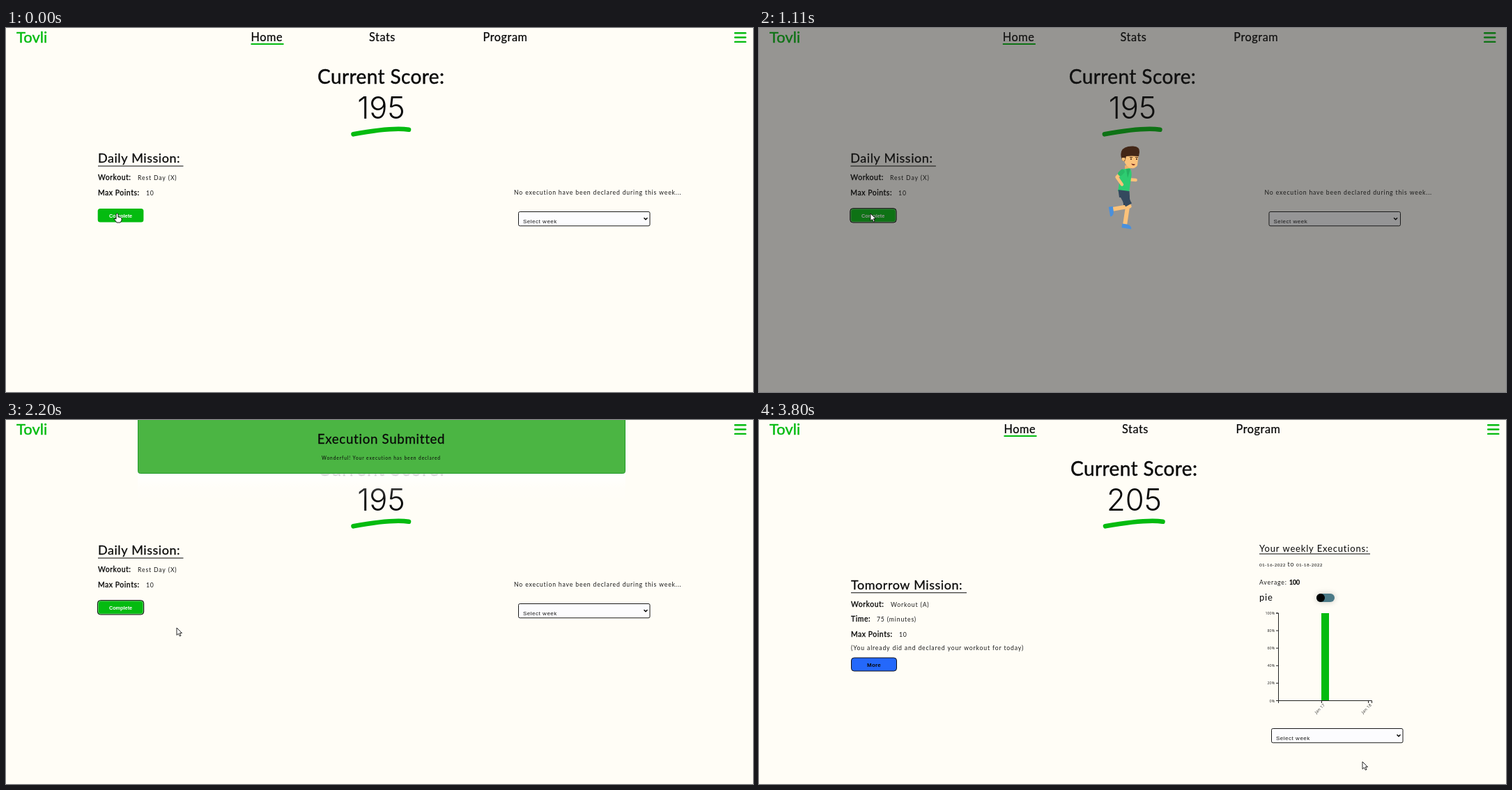
Animation of 1072x522 px, one loop 4.65 s. Source, as an HTML page with a canvas:

```html
<!DOCTYPE html>
<html lang="en">
<head>
<meta charset="utf-8">
<title>Daily mission</title>
<style>
  html, body { margin: 0; width: 100%; height: 100%; overflow: hidden; background: #fffdf6; }
  canvas { display: block; }
</style>
</head>
<body>
<canvas id="stage" width="1072" height="522"></canvas>
<script>
const ctx = document.getElementById('stage').getContext('2d');
const LOOP = 4650;
const GREEN = '#04bb10', INK = '#080808', PAPER = '#fffdf6', SKIN = '#fbc27a';
const MODAL_IN = 710, MODAL_OUT = 1530, TOAST_OUT = 2350, SWAP = 2660;
const UI = '"Liberation Sans", Arial, sans-serif';
const ROUND = 'Lato, "Open Sans", sans-serif';

// The page is slightly narrower while the modal is open.
let squeeze = 1;
const X = x => x * squeeze;

const clamp = v => Math.max(0, Math.min(1, v));
const span = (t, from, to) => clamp((t - from) / (to - from));
const easeOut = p => 1 - (1 - p) ** 3;

function cssEase(p) {
  let lo = 0, hi = 1;
  const bez = (s, a, b) => 3 * s * (1 - s) ** 2 * a + 3 * s * s * (1 - s) * b + s ** 3;
  for (let i = 0; i < 18; i++) {
    const mid = (lo + hi) / 2;
    if (bez(mid, .25, .25) < p) lo = mid; else hi = mid;
  }
  return bez(lo, .1, 1);
}

// bold: extra outline in em, giving rounded medium weights
function text(str, x, y, size, { ls = 0, bold = 0, color = INK, font = ROUND, weight = 400, align = 'left' } = {}) {
  ctx.font = `${weight} ${size}px ${font}`;
  ctx.letterSpacing = ls + 'px';
  ctx.textAlign = align;
  ctx.fillStyle = ctx.strokeStyle = color;
  ctx.fillText(str, X(x), y);
  if (bold) {
    ctx.lineWidth = bold * size;
    ctx.lineJoin = 'round';
    ctx.strokeText(str, X(x), y);
  }
}

function box(x, y, w, h, r, fill, stroke) {
  ctx.beginPath();
  ctx.roundRect(X(x), y, w, h, r);
  if (fill) { ctx.fillStyle = fill; ctx.fill(); }
  if (stroke) { ctx.strokeStyle = stroke; ctx.lineWidth = 1; ctx.stroke(); }
}

function line(points, color, width) {
  ctx.beginPath();
  points.forEach(([x, y]) => ctx.lineTo(x, y));
  ctx.strokeStyle = color;
  ctx.lineWidth = width;
  ctx.stroke();
}

function shape(d, fill, stroke, width = 1) {
  const path = new Path2D(d);
  if (fill) { ctx.fillStyle = fill; ctx.fill(path); }
  if (stroke) { ctx.strokeStyle = stroke; ctx.lineWidth = width; ctx.stroke(path); }
}

const heading = (s, x, y) => text(s, x, y, 18, { ls: .55, bold: .014 });
const label = (s, y) => text(s, 132, y, 10.5, { ls: .52, bold: .03 });
const note = (s, x, y) => text(s, x, y, 8.7, { ls: .83, color: '#1c1c1c' });

function nav() {
  text('Tovli', 15, 21, 22, { color: GREEN, bold: .02 });
  const item = { ls: .55, bold: .015 };
  text('Home', 351.5, 18.5, 16.3, item);
  text('Stats', 521, 19, 16.3, item);
  text('Program', 684.5, 19, 16.3, item);
  box(351.5, 22, 47, 2, 0, GREEN);
  for (const y of [6, 12.3, 18.7]) box(1045, y, 17.5, 2.4, 1.2, GREEN);
}

function score(value, t) {
  const pulse = Math.sin(Math.PI * span(t, 2790, 3790)) ** 1.5;
  const halfWidth = value > 199 ? 43 : 41.5;
  ctx.save();
  ctx.translate(X(538.5), 121.5);
  ctx.scale(1 + .45 * pulse, 1 + .45 * pulse);
  ctx.translate(-X(538.5), -121.5);
  if (pulse > .01) glow(pulse);
  text(String(value), 538.5, 130, 43.5, { font: 'Inter, "Open Sans", sans-serif', weight: 300, align: 'center' });
  ctx.translate(X(538.5), 0);
  ctx.lineCap = 'round';
  shape(`M${1.5 - halfWidth},152.3 C-14,147.5 18,142.5 ${halfWidth - 2},145.7`, null, GREEN, 6.6);
  ctx.restore();
  text('Current Score:', 447, 80, 28, { ls: .4, bold: .014 });
}

function glow(alpha) {
  ctx.save();
  const outside = new Path2D('M400,40H680V200H400Z');
  outside.roundRect(457, 84.5, 163, 75, 10);
  ctx.clip(outside, 'evenodd');
  ctx.globalAlpha = alpha * .75;
  ctx.shadowColor = GREEN;
  ctx.shadowBlur = 7;
  for (const dx of [-3, 3]) {
    ctx.shadowOffsetX = dx;
    box(457, 84.5, 163, 75, 10, GREEN);
  }
  ctx.restore();
}

function select(y) {
  box(735.5, y, 188.5, 20.3, 2, '#fcfcfe', '#1a1a1a');
  text('Select week', 742, y + 16, 8, { ls: .52, font: UI, color: '#151515' });
  const x = X(918);
  line([[x - 2.5, y + 8.7], [x, y + 11.3], [x + 2.5, y + 8.7]], '#000', 1.4);
}

function todayPage(t) {
  heading('Daily Mission:', 132, 193);
  box(132, 197.5, 122.5, 1, 0, INK);
  label('Workout:', 218);
  note('Rest Day (X)', 189, 218);
  label('Max Points:', 239.5);
  note('10', 201, 239.5);
  box(131.7, 259, 65.7, 19.5, 3.5, GREEN);
  if (t > 150) {
    box(132.5, 259.8, 64.2, 18.2, 3, null, 'rgba(255,255,255,.4)');
    box(131.4, 258.7, 66.3, 20.3, 4, null, '#000');
  }
  text('Complete', 164.5, 271.5, 7.3, { font: UI, weight: 700, color: '#fff', align: 'center' });
  note('No execution have been declared during this week...', 729, 239);
  select(263.5);
}

function tomorrowPage(t) {
  heading('Tomorrow Mission:', 132, 243);
  box(132, 247.3, 166, 1, 0, INK);
  label('Workout:', 267.5);
  note('Workout (A)', 189, 267.5);
  label('Time:', 289);
  note('75 (minutes)', 169, 289);
  label('Max Points:', 310.5);
  note('10', 201, 310.5);
  note('(You already did and declared your workout for today)', 132, 329.5);
  box(132.5, 341, 65, 19, 4, '#2468fb', '#101018');
  text('More', 165, 353.8, 8, { font: UI, weight: 700, align: 'center', ls: .2 });

  text('Your weekly Executions:', 718, 189, 13, { ls: .82 });
  box(718, 191.5, 159, 1, 0, INK);
  text('01-16-2022', 718, 210, 6.4, { ls: .35 });
  note('to', 758.5, 210);
  text('01-18-2022', 771, 210, 6.4, { ls: .35 });
  note('Average:', 718, 236);
  text('100', 761, 236, 8.7, { bold: .05 });
  text('pie', 718, 259, 13, { ls: .8 });
  ctx.save();
  ctx.shadowColor = 'rgba(0,0,0,.22)';
  ctx.shadowBlur = 9;
  box(800, 249, 26, 12, 6, '#4b7a87');
  ctx.restore();
  box(800, 249, 12, 12, 6, '#000');
  chart(t);
  select(442.5);
}

function chart(t) {
  const small = { font: '"Open Sans", sans-serif', color: '#222', align: 'right' };
  const height = 126 * easeOut(span(t, SWAP, 3200));
  box(807, 403 - height, 11, height, 0, GREEN);
  line([[742, 277], [745.5, 277], [745.5, 402.5], [742, 402.5]], '#222', 1);
  line([[745.5, 406], [745.5, 402.5], [879.5, 402.5], [879.5, 406]], '#222', 1);
  for (let i = 0; i <= 5; i++) {
    const y = 402.5 - i * 25.1;
    line([[742, y], [745, y]], '#222', 1);
    text(i * 20 + '%', 740, y + 2, 5.3, small);
  }
  [['Jan 17', 807.5], ['Jan 18', 874.5]].forEach(([day, x]) => {
    line([[x, 403], [x, 406]], '#222', 1);
    ctx.save();
    ctx.translate(x + 5, 409);
    ctx.rotate(-Math.PI / 4);
    text(day, 0, 0, 5.6, { ...small, ls: .3 });
    ctx.restore();
  });
}

function toast(t) {
  const shown = easeOut(span(t, MODAL_OUT, 1790)) * (1 - span(t, TOAST_OUT, SWAP) ** 2);
  if (shown <= 0) return;
  ctx.save();
  ctx.translate(0, -118 * (1 - shown));
  const fade = ctx.createLinearGradient(0, 76, 0, 118);
  fade.addColorStop(0, 'rgba(255,255,255,.95)');
  fade.addColorStop(.5, 'rgba(255,255,255,.2)');
  fade.addColorStop(1, 'rgba(255,255,255,0)');
  ctx.fillStyle = fade;
  ctx.fillRect(189, 76, 700, 42);
  box(189.5, -6, 699, 82.5, 3, '#4bb543', '#239a2b');
  text('Execution Submitted', 538.5, 34, 18.7, { ls: .7, bold: .014, align: 'center' });
  text('Wonderful! Your execution has been declared', 538.5, 57, 6.6, { ls: .92, align: 'center' });
  ctx.restore();
}

// Leg cycle: phase, thigh angle, shin angle; degrees forward from straight down
const STRIDE = [[0, 35, 29], [.1, 28, 4], [.3, -10, -20], [.5, -10, -92], [.6, 10, -113], [.8, 45, -50], [.92, 42, 15]];

function stride(phase, column) {
  const p = phase % 1, n = STRIDE.length;
  let i = n - 1;
  while (STRIDE[i][0] > p) i--;
  const at = k => STRIDE[(k + n) % n][column];
  const end = i + 1 < n ? STRIDE[i + 1][0] : 1;
  const u = (p - STRIDE[i][0]) / (end - STRIDE[i][0]);
  return (at(i) + (at(i + 1) - at(i)) * u) * Math.PI / 180;
}

const reach = ([x, y], angle, length) => [x + Math.sin(angle) * length, y + Math.cos(angle) * length];

function leg(phase, hip, cloth) {
  const thigh = stride(phase, 1), shin = stride(phase, 2);
  const knee = reach(hip, thigh, 20), ankle = reach(knee, shin, 24.5);
  ctx.lineCap = 'round';
  line([hip, knee, ankle], SKIN, 6);
  ctx.lineCap = 'butt';
  line([hip, reach(hip, thigh, 18)], cloth, 10);
  ctx.save();
  ctx.translate(...ankle);
  ctx.rotate(-Math.min(shin, 0));
  shape('M-4,-1 L3,-1 Q10,0 10,5 L-4,5 Z', '#4a90dc');
  ctx.restore();
}

// The shoulders turn with the arms.
function arm(phase, sleeve) {
  const swing = Math.cos(2 * Math.PI * (phase + .12));
  const shoulder = [524 - 6 * swing, 206];
  const upper = (-20 - 55 * swing) * Math.PI / 180;
  const fore = upper + 80 * Math.PI / 180;
  const elbow = reach(shoulder, upper, 11);
  ctx.lineCap = 'round';
  line([shoulder, elbow, reach(elbow, fore, 13)], SKIN, 4.5);
  line([shoulder, reach(shoulder, upper, 4)], sleeve, 6.5);
}

function runner(t) {
  const phase = (t - 910 + 1960) / 980;
  ctx.save();
  ctx.lineJoin = 'round';
  arm(phase, '#25b062');
  leg(phase, [526, 238], '#2b3b50');
  shape('M525,197 H533 V205 H525 Z', '#eeb068');
  shape('M520,203 L532,201 Q536,206 534,215 L531,236 L515,234 Q518,219 518,208 Z', '#2ecc71');
  shape('M527,202 L533,202 L529,215 Z', '#25b062');
  leg(phase + .5, [522, 238], '#34495e');
  shape('M515.5,232 L531.5,234 L532,243 L517,243 Z', '#34495e');
  arm(phase + .5, '#28bb67');
  shape('M523,181 L545,179 L543,197 Q540,202 534,201 Q526,199 524,190 Z', SKIN);
  shape('M522,191 Q518,184 520,177 Q523,169 537,169.5 Q547,170 546,178 L545,184 Q534,183 527,184 L525,191 Z', '#432717');
  shape('M521,186 a2.5,3 0 1 0 4,0 Z', SKIN);
  ctx.fillStyle = '#432717';
  for (const x of [533, 541]) {
    ctx.fillRect(x - 1, 185, 4, 1);
    ctx.fillRect(x, 187, 1.8, 1.8);
  }
  shape('M534,194.5 Q537,199 540,195.5 Z', '#7a2d22');
  ctx.restore();
}

const TRACK = [[1450, 160, 266], [1800, 230, 290], [1850, 232, 291], [2200, 245, 298], [2870, 245, 298],
  [2920, 259, 303], [3280, 621, 401], [3400, 800, 436], [3520, 845, 468], [3800, 866, 490]];

function pointer(t) {
  let i = 0;
  while (i < TRACK.length - 2 && TRACK[i + 1][0] < t) i++;
  const [a, b] = [TRACK[i], TRACK[i + 1]];
  const p = span(t, a[0], b[0]);
  ctx.save();
  ctx.translate(a[1] + (b[1] - a[1]) * p, a[2] + (b[2] - a[2]) * p);
  ctx.lineJoin = 'round';
  if (t < 350) {
    shape('M-2,1 Q-.5,-1.5 1,1 V5 L4.5,5.5 L6,7 V10 L4,13 H-1 L-5,8 Q-5,6 -2,8 Z', '#fff', '#000', .9);
  } else {
    shape('M0,0 V10.5 L2.5,8.3 L4.3,12 L6,11.2 L4.3,7.6 H7.5 Z', '#fff', '#111', .9);
  }
  ctx.restore();
}

function draw(t) {
  const modal = t >= MODAL_IN && t < MODAL_OUT;
  const swapped = t >= SWAP;
  squeeze = modal ? .9952 : 1;
  ctx.fillStyle = PAPER;
  ctx.fillRect(0, 0, 1072, 522);
  nav();
  score(swapped ? 205 : 195, t);
  if (swapped) tomorrowPage(t); else todayPage(t);
  if (modal) {
    ctx.fillStyle = `rgba(28,28,28,${.67 * cssEase(span(t, 865, 1475))})`;
    ctx.fillRect(0, 0, 1072, 522);
    runner(t);
  }
  toast(t);
  pointer(t);
}

const start = performance.now();
function tick() {
  draw((performance.now() - start) % LOOP);
  requestAnimationFrame(tick);
}
tick();
</script>
</body>
</html>
```
